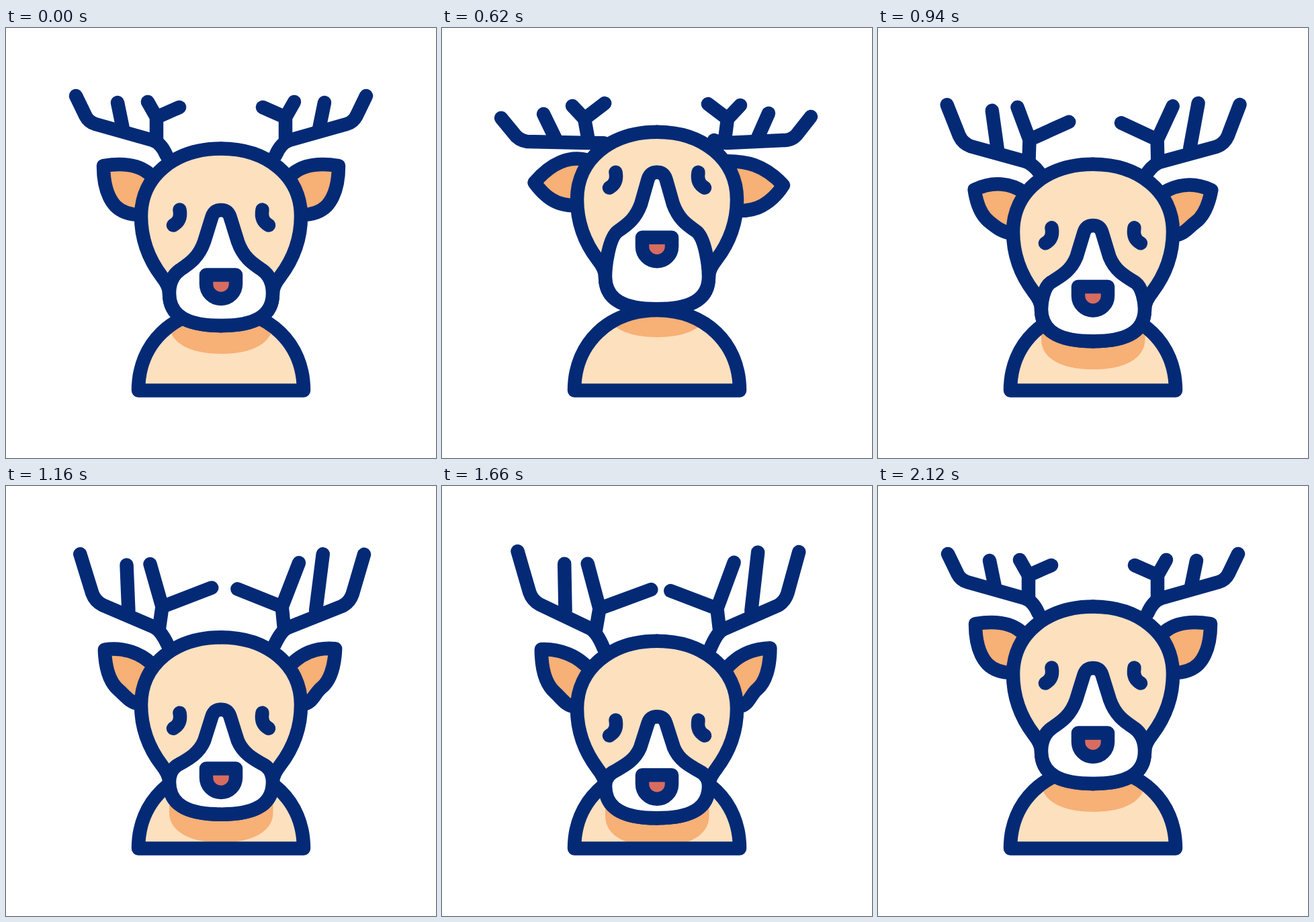
These frames come from a looping animation (640x640 px, 2.4 s). An HTML page:

```html
<!DOCTYPE html>
<html lang="en">
<head>
<meta charset="utf-8">
<title>Nodding deer</title>
<style>
  html, body { margin: 0; height: 100%; overflow: hidden; background: #fff; }
  svg { display: block; width: 100vw; height: 100vh; }
  .line { fill: none; stroke: #042a76; stroke-width: 20.5; stroke-linecap: round; stroke-linejoin: round; }
  .skin { fill: #fde0be; }
  .ear { fill: #f7b075; }
  .face { fill: #fff; }
  .nose { fill: #d86c60; }
</style>
</head>
<body>
<svg viewBox="0 0 640 640">
  <defs>
    <path id="torso" d="M197 539.500C197 469 249 420 320 420S443 469 443 539.500Z"/>
    <clipPath id="inside"><use href="#torso"/></clipPath>
  </defs>
  <use href="#torso" class="skin"/>
  <g clip-path="url(#inside)">
    <path id="shadow" fill="#f7b075" d="M243 440C243 468 272 485 320 485S397.500 468 397.500 440V380H243Z"/>
  </g>
  <use href="#torso" class="line"/>
  <g id="head">
    <g id="left"></g>
    <g id="right" transform="matrix(-1 0 0 1 640 0)"></g>
    <path id="nose" class="line nose" d="M298 367.500H342V381A22 22 0 0 1 298 381Z"/>
  </g>
</svg>
<script>
const $ = id => document.getElementById(id);
const LOOP = 2400, UP = 600, DOWN = 1500, END = 2120;
const HEAD_UP = -25, HEAD_DOWN = 54;

// Each morph holds the same path in three poses: rest, up, down.
const antlerRest = [
  'M104 101L118.5 131Q123 140 133 143L218 167Q231 171 239 190',
  'M166 111L174 150',
  'M211 110L224 133L258 118M224 133L224 167'
];
const earRest = 'M212 216C195 202 170 201 145 205C145 230 151 252 163 265C172 274 184 278 200 278';

const sides = {
  left: {
    antlerUp: [
      'M88 134L107 157Q114 167 127 169L215 171Q229 171 241 171',
      'M151 128L169 165',
      'M194 116L212 135L242 112M212 135L218 168'
    ],
    antlerDown: [
      'M113 97L131 160Q135 172 146 178L220 214Q231 220 241 245',
      'M183 116L184 188',
      'M217 116L235 185L314 156M235 185L229 218'
    ],
    earUp: 'M215 196C190 190 163 200 137.5 230C145 240 153 249 163 255C172 261 186 264 200 264.5',
    earDown: 'M221 277C203 255 175 244 148 245C148 275 155 298 169 310C178 318 184 329 196 331'
  },
  right: {
    antlerUp: [
      'M91 132L110 156Q117 166 129 167L216 171Q226 171 235 167',
      'M154 127L170 163',
      'M196 115L215 135L244 113M215 135L219 166'
    ],
    antlerDown: [
      'M109 98L126 161Q130 174 141 180L222 216Q231 221 241 245',
      'M170 98L180 188',
      'M205 114L231 185L302 158M231 185L227 217'
    ],
    earUp: 'M215 198C190 198 161 202 132 234C143 251 154 259 163 264C173 270 186 272 200 272',
    earDown: 'M219 277C201 254 178 244 152 243C152 272 159 294 171 304C182 313 183 329 198 331'
  }
};

const face = [
  'M320 443C272 443 243 430 243 395C243 378 249 367 259 360C274 350 287 341 295 318L306.5 281C309 273.5 314 271 320 271',
  'M320 418C272 418 243 405 243 370C243 355 248 312 262 302C278 291 288 283 296 262L306.5 225C309 217 314 214.5 320 214.5',
  'M320 497C272 497 243 484 243 449C243 441 246 435 253 430C271 420 287 412 295 393L306.5 357C309 349.5 314 347 320 347'
];
const skull = 'M320 179.500C252 179.500 201 220 201 280C201 316 213 345 232 370Q243 384 243 395C243 430 272 443 320 443';
const eye = 'M258.500 270.500C260.500 282 257 289 249 293.500';

const morphs = [], shifts = [];

function addPath(parent, className, d) {
  const path = document.createElementNS('http://www.w3.org/2000/svg', 'path');
  path.setAttribute('class', className);
  path.setAttribute('d', d);
  parent.append(path);
  return path;
}

function addMorph(parent, className, poses) {
  const [rest, up, down] = poses.map(d => d.match(/[\d.]+/g).map(Number));
  const path = addPath(parent, className, poses[0]);
  morphs.push({ path, shape: poses[0], rest, up, down });
}

function addShift(el, up, down) {
  shifts.push({ el, up, down });
}

for (const [id, side] of Object.entries(sides)) {
  const group = $(id);
  antlerRest.forEach((d, i) => addMorph(group, 'line', [d, side.antlerUp[i], side.antlerDown[i]]));
  addMorph(group, 'line ear', [earRest, side.earUp, side.earDown]);
  addShift(addPath(group, 'line skin', skull), HEAD_UP, HEAD_DOWN);
  addMorph(group, 'line face', face);
  addShift(addPath(group, 'line', eye), -56, 82);
}
addShift($('nose'), -56, 66);

// Easing curve with flat ends; a and b are the handle lengths in time.
function ease(x, a, b) {
  let lo = 0, hi = 1, s = 0.5;
  for (let i = 0; i < 24; i++) {
    s = (lo + hi) / 2;
    const at = 3 * s * (1 - s) ** 2 * a + 3 * s * s * (1 - s) * b + s ** 3;
    if (at < x) lo = s; else hi = s;
  }
  return s * s * (3 - 2 * s);
}

// Weights of the up and down poses; a smaller start handle drops sooner.
function weights(t, dropStart) {
  if (t < UP) return [ease(t / UP, 0.333, 0.667), 0];
  if (t < DOWN) {
    const p = ease((t - UP) / (DOWN - UP), dropStart, 0.22);
    return [1 - p, p];
  }
  if (t < END) return [0, 1 - ease((t - DOWN) / (END - DOWN), 0.75, 0.667)];
  return [0, 0];
}

function moveY(el, y) {
  el.setAttribute('transform', `translate(0 ${y.toFixed(2)})`);
}

function draw(now) {
  const t = now % LOOP;
  const [u, d] = weights(t, 0.35);
  const headY = ([up, down]) => HEAD_UP * up + HEAD_DOWN * down;
  const y = headY(weights(t, 0.31));

  for (const m of morphs) {
    let i = 0;
    m.path.setAttribute('d', m.shape.replace(/[\d.]+/g, () => {
      const r = m.rest[i];
      const value = r + (m.up[i] - r) * u + (m.down[i] - r) * d;
      i++;
      return value.toFixed(2);
    }));
  }
  for (const s of shifts) moveY(s.el, s.up * u + s.down * d);
  // The head as a whole runs slightly ahead of its changing shapes.
  moveY($('head'), y - headY([u, d]));
  moveY($('shadow'), y);
}

const start = performance.now();
function tick() {
  draw(performance.now() - start);
  requestAnimationFrame(tick);
}
tick();
</script>
</body>
</html>
```
